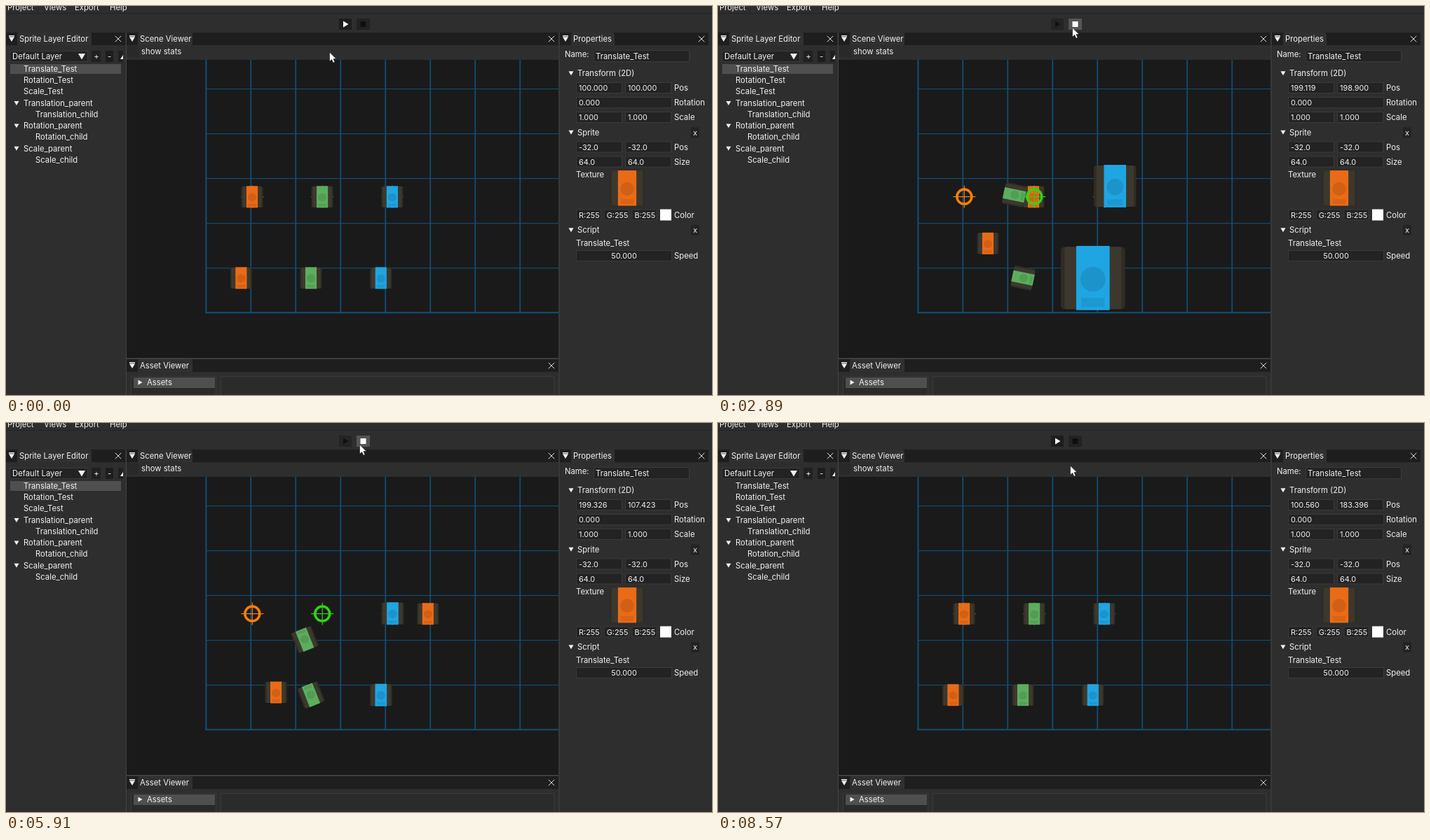
These frames come from a looping animation (1007x556 px, 8650 ms). An HTML page with a canvas:

```html
<!DOCTYPE html>
<html lang="en">
<head>
<meta charset="utf-8">
<title>Scene editor</title>
<style>
html, body { margin: 0; width: 100%; height: 100%; overflow: hidden; background: #2e2e2e; }
canvas { display: block; width: 1007px; height: 556px; }
</style>
</head>
<body>
<canvas id="stage"></canvas>
<script>
const W = 1007, H = 556, LOOP = 8650;
const PLAY = 13, STOP = 103, START = 12.2;
const PANEL = '#2e2e2e', DARK = '#1d1d1d', FIELD = '#232323', EDGE = '#3a3a3a';
const LINE = '#444444', PICK = '#4f4f4f', INK = '#f2f2f2';
const ORANGE = '#ea6b17', GREEN = '#5cae5d', BLUE = '#1fa5e2';

const canvas = document.getElementById('stage');
const ctx = canvas.getContext('2d');
const dpr = window.devicePixelRatio || 1;
canvas.width = W * dpr;
canvas.height = H * dpr;

const beats = [[0, 0], [1010, 13], [1880, 24], [2820, 36], [3740, 48], [4680, 60],
  [5590, 72], [6460, 83], [7400, 95], [8020, 103], [8340, 107], [8570, 110], [8650, 111]];
// Distance walked: [tick, units]
const walked = [[START, 0], [16, 30.077], [37, 198.019], [51, 305.66], [67, 430.652],
  [86, 580.544], [102.2, 708.4]];
const route = [[100, 100], [199.119, 100], [199.119, 199.5], [100.902, 199.5], [100.902, 100.265],
  [199.326, 100.265], [199.326, 199.4], [100.56, 199.4], [100.56, 183.396]];
// Pointer: [tick, x, y]
const pointer = [[0, 462, 66], [1, 463, 65], [6, 487, 31], [28, 487, 31], [33, 506, 31],
  [38, 506, 31], [39, 505, 31], [106, 505, 31], [110, 503, 61]];

function sample(points, x, col = 1) {
  if (x <= points[0][0]) return points[0][col];
  for (let i = 1; i < points.length; i++) {
    const a = points[i - 1], b = points[i];
    if (x <= b[0]) return a[col] + (b[col] - a[col]) * (x - a[0]) / (b[0] - a[0]);
  }
  return points[points.length - 1][col];
}

function along(path, dist) {
  for (let i = 1; i < path.length; i++) {
    const [ax, ay] = path[i - 1], [bx, by] = path[i];
    const len = Math.hypot(bx - ax, by - ay);
    if (dist <= len) return [ax + (bx - ax) * dist / len, ay + (by - ay) * dist / len];
    dist -= len;
  }
  return path[path.length - 1];
}

function rect(x, y, w, h, color) {
  ctx.fillStyle = color;
  ctx.fillRect(x, y, w, h);
}

function round(x, y, w, h, r, color) {
  ctx.fillStyle = color;
  ctx.beginPath();
  ctx.roundRect(x, y, w, h, r);
  ctx.fill();
}

function poly(points, color) {
  ctx.fillStyle = color;
  ctx.beginPath();
  points.forEach(([x, y]) => ctx.lineTo(x, y));
  ctx.closePath();
  ctx.fill();
}

function text(str, x, mid, size = 11.3, align = 'left') {
  ctx.font = size + 'px Inter, "Open Sans", sans-serif';
  ctx.textAlign = align;
  ctx.fillStyle = INK;
  ctx.fillText(str, x, mid + 4);
}

function frameBox(x, y, w, h, fill = FIELD) {
  rect(x, y, w, h, EDGE);
  rect(x + 1, y + 1, w - 2, h - 2, fill);
}

function field(str, x, mid, w = 66) {
  frameBox(x, mid - 8, w, 16);
  text(str, x + 4, mid, 10.9);
}

function downArrow(x, y, r = 3.5) {
  poly([[x - r, y - r * 0.8], [x + r, y - r * 0.8], [x, y + r * 0.9]], INK);
}

function rightArrow(x, y) {
  poly([[x - 2.5, y - 3.5], [x + 3.5, y], [x - 2.5, y + 3.5]], INK);
}

function titleBar(name, x, y, w, tab) {
  rect(x, y, w, 18, '#1e1e1e');
  round(x + 16, y, tab, 18, [3, 3, 0, 0], '#303030');
  rect(x + 4, y + 4, 8, 1.5, INK);
  downArrow(x + 8, y + 9.5, 4);
  text(name, x + 19, y + 9);
  const cx = x + w - 10, cy = y + 9, r = 4.2;
  ctx.strokeStyle = '#e0e0e0';
  ctx.lineWidth = 1;
  ctx.beginPath();
  ctx.moveTo(cx - r, cy - r);
  ctx.lineTo(cx + r, cy + r);
  ctx.moveTo(cx + r, cy - r);
  ctx.lineTo(cx - r, cy + r);
  ctx.stroke();
}

function sprite(x, y, size, color, angle = 0) {
  ctx.save();
  ctx.translate(x, y);
  ctx.rotate(angle);
  ctx.scale(size, size);
  round(-0.5, -0.485, 1, 0.97, 0.06, '#302c25');
  round(-0.44, -0.485, 0.88, 0.97, 0.03, '#3d382d');
  rect(-0.26, -0.5, 0.52, 1, color);
  ctx.fillStyle = 'rgba(0,0,0,0.1)';
  ctx.beginPath();
  ctx.arc(0, 0.02, 0.195, 0, Math.PI * 2);
  ctx.fill();
  rect(-0.18, 0.31, 0.36, 0.14, 'rgba(0,0,0,0.08)');
  ctx.restore();
}

function gizmo(x, y, color) {
  ctx.strokeStyle = color;
  ctx.lineWidth = 3.5;
  ctx.beginPath();
  ctx.arc(x, y, 10.5, 0, Math.PI * 2);
  ctx.stroke();
  rect(x - 16, y - 0.6, 32, 1.2, color);
  rect(x - 0.6, y - 16, 1.2, 32, color);
}

function grid() {
  const line = '#10507a';
  for (let x = 349; x < 788; x += 64) rect(x - 0.6, 77, 1.7, 361, line);
  for (let y = 118; y < 430; y += 64) rect(285, y, 503, 1.1, line);
  rect(284.4, 77, 2, 362, line);
  rect(284.4, 437.3, 504, 2, line);
}

function scene(tick, dist, pos) {
  const live = tick >= PLAY && tick < STOP;
  const run = live ? tick - START : 0;
  const spin = -run * 7.9 * 0.4 * Math.PI / 180;
  const grow = live ? dist * 0.02 : 0;
  const size = 31;

  ctx.save();
  ctx.beginPath();
  ctx.rect(172, 77, 616, 426);
  ctx.clip();
  rect(172, 77, 616, 426, '#1a1a1a');
  grid();

  const [px, py] = live ? pos : [100, 100];
  sprite(285.4 + px / 2, 438.8 - py / 2, size, ORANGE);
  sprite(435, 388.8, size, GREEN, spin);
  sprite(534.8, 388.8, size * (1 + grow % 2), BLUE);

  gizmo(351.3, 272.6, '#fa8008');
  sprite(351 + (live ? dist / 2 : 0), 272.8, size, ORANGE);

  gizmo(451.2, 272.6, '#30d416');
  const turn = spin - Math.PI / 4, reach = 16 * Math.SQRT2;
  sprite(435.1 + reach * Math.cos(turn), 288.8 + reach * Math.sin(turn), size, GREEN, spin);

  gizmo(551, 272.6, '#2a8be6');
  const k = 1 + grow % 1;
  sprite(534.9 + 16 * k, 288.8 - 16 * k, size * k, BLUE);
  ctx.restore();
}

function toolbar(tick) {
  const live = tick >= PLAY && tick < STOP;
  let playBg = DARK, stopBg = DARK;
  if (!live && tick >= 6 && tick < PLAY) playBg = tick >= 11 ? '#636363' : '#4c4c4c';
  if (live && tick >= 33) stopBg = tick >= STOP - 1 ? '#686868' : '#555555';
  if (live) playBg = '#242424';
  if (!live) stopBg = '#222222';
  rect(475, 18, 18, 16, playBg);
  rect(500, 18, 19, 16, stopBg);
  poly([[481, 21.5], [488.5, 26], [481, 30.5]], live ? '#111111' : '#ffffff');
  rect(505.5, 22, 8, 8, live ? '#ffffff' : '#0f0f0f');
}

function layers(selected) {
  titleBar('Sprite Layer Editor', 0, 38, 170, 106);
  frameBox(5, 64, 112, 16);
  text('Default Layer', 9, 72);
  downArrow(108, 72, 5);
  rect(122, 64, 13, 16, '#202020');
  rect(142, 64, 11, 16, DARK);
  text('+', 129, 72, 11.3, 'center');
  text('-', 147.5, 72, 11.3, 'center');
  rect(160, 64, 7, 16, '#202020');
  poly([[167, 70], [167, 76], [163, 76]], INK);

  if (selected) rect(6, 83, 158, 14, PICK);
  ['Translate', 'Rotation', 'Scale'].forEach((kind, i) => {
    text(kind + '_Test', 25, 90 + 16.2 * i);
    const stem = i ? kind : 'Translation';
    const y = 138.8 + 32.4 * i;
    downArrow(15, y);
    text(stem + '_parent', 25, y);
    text(stem + '_child', 42, y + 16.2);
  });
}

function section(name, y, closable) {
  downArrow(806, y);
  text(name, 815, y);
  if (!closable) return;
  rect(977, y - 7, 12, 15, FIELD);
  text('x', 983, y, 10.9, 'center');
}

function properties(pos) {
  titleBar('Properties', 790, 38, 212, 62);
  text('Name:', 797, 69);
  frameBox(838, 63, 137, 17);
  text('Translate_Test', 841, 72);

  section('Transform (2D)', 96);
  const pair = (a, b, y, label) => {
    field(a, 813, y);
    field(b, 883, y);
    text(label, 953, y);
  };
  pair(pos[0].toFixed(3), pos[1].toFixed(3), 117, 'Pos');
  field('0.000', 813, 138, 137);
  ctx.save();
  ctx.beginPath();
  ctx.rect(950, 128, 49, 20);
  ctx.clip();
  text('Rotation', 953, 138);
  ctx.restore();
  pair('1.000', '1.000', 159, 'Scale');

  section('Sprite', 180.5, true);
  pair('-32.0', '-32.0', 201.5, 'Pos');
  pair('64.0', '64.0', 222.5, 'Size');
  text('Texture', 813, 241);
  sprite(886, 260.3, 50.5, ORANGE);
  ['R', 'G', 'B'].forEach((c, i) => field(c + ':255', 813 + 39.7 * i, 298.5, 36));
  rect(933, 290.5, 16, 16, '#ffffff');
  text('Color', 953, 298.5);

  section('Script', 320, true);
  text('Translate_Test', 813, 338.5);
  frameBox(813, 349, 137, 16);
  text('50.000', 881.5, 357, 10.9, 'center');
  text('Speed', 953, 357);
}

function assets() {
  rect(172, 503, 616, 1.5, LINE);
  titleBar('Asset Viewer', 172, 505, 616, 78);
  frameBox(178, 529, 122, 40, '#2a2a2a');
  rect(182, 531, 116, 15, PICK);
  rightArrow(191, 538);
  text('Assets', 201, 538);
  frameBox(306, 529, 476, 40, '#2b2b2b');
}

function cursor(x, y) {
  const shape = [[-0.5, 0], [-0.5, 13.2], [2.6, 10.4], [4.8, 15.2], [7, 14.2], [5, 9.5], [9, 9.5]];
  ctx.save();
  ctx.translate(x, y);
  poly(shape, '#ffffff');
  ctx.strokeStyle = '#111111';
  ctx.lineWidth = 0.6;
  ctx.stroke();
  ctx.restore();
}

function draw(ms) {
  const tick = Math.floor(sample(beats, ms) + 0.2);
  const dist = tick < PLAY ? 0 : sample(walked, tick);
  const pos = along(route, dist);

  ctx.setTransform(dpr, 0, 0, dpr, 0, 0);
  rect(0, 0, W, H, PANEL);
  [['Project', 2], ['Views', 54], ['Export', 98], ['Help', 148]].forEach(([s, x]) => text(s, x, 2));
  rect(0, 10, W, 1, '#222222');
  toolbar(tick);
  layers(tick < STOP);
  titleBar('Scene Viewer', 172, 38, 616, 78);
  rect(173, 57, 16, 16, '#292929');
  text('show stats', 193, 65);
  scene(tick, dist, pos);
  assets();
  properties(pos);
  rect(171, 38, 1, 518, LINE);
  rect(788.5, 38, 1, 518, LINE);
  cursor(sample(pointer, tick, 1), sample(pointer, tick, 2));
}

function loop() {
  draw((performance.now() - begin) % LOOP);
  requestAnimationFrame(loop);
}

const begin = performance.now();
loop();
</script>
</body>
</html>
```
